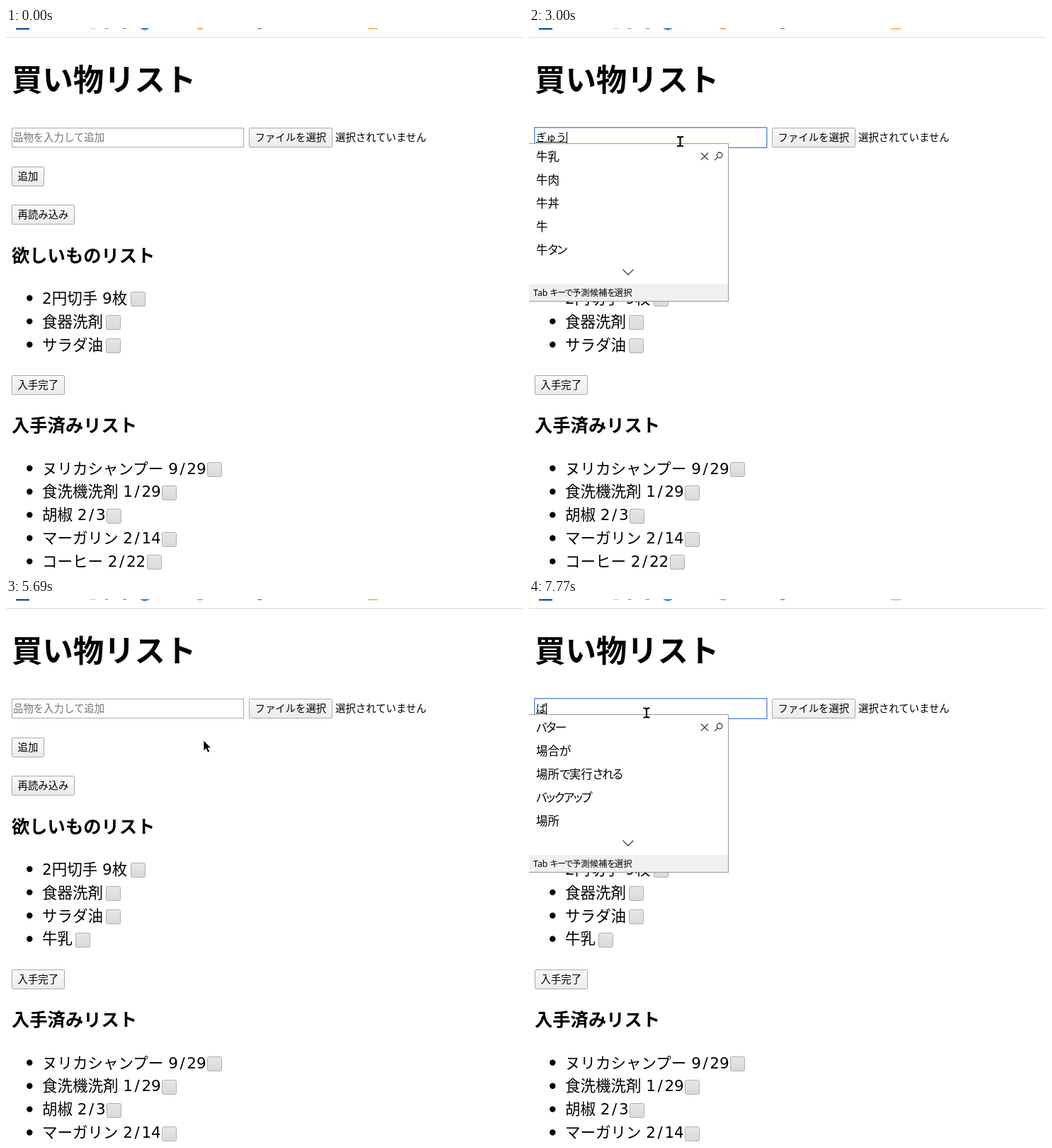
Write an HTML page that moves like this. It is 730 by 768 pixels and loops after 8000 ms.

```html
<!DOCTYPE html>
<html lang="ja">
<meta charset="utf-8">
<title>買い物リスト</title>
<style>
html, body { margin: 0; width: 100%; height: 100%; overflow: hidden; background: #fff }
svg { display: block; font-family: "DejaVu Sans", "Noto Sans CJK JP", "Noto Sans CJK", sans-serif }
.ime { font-family: "Noto Sans", "Noto Sans CJK JP", "Noto Sans CJK", sans-serif; font-feature-settings: "palt" }
.kana { letter-spacing: -.09em }
.slash { letter-spacing: .12em }
.drop { filter: drop-shadow(0 1px 2px #0006) }
</style>
<svg width="730" height="768" viewBox="0 0 730 768">
  <defs>
    <linearGradient id="face" x2="0" y2="1"><stop stop-color="#fafafa"/><stop offset="1" stop-color="#ebebeb"/></linearGradient>
    <linearGradient id="tick" x2="0" y2="1"><stop stop-color="#e6e6e6"/><stop offset="1" stop-color="#d9d9d9"/></linearGradient>
  </defs>
  <g id="scene"></g>
</svg>
<script>
const LOOP = 8000, SMALL = 14.4;
const scene = document.getElementById('scene');

const text = (x, y, size, str, attrs = '') =>
  `<text x="${x}" y="${y}" font-size="${size}" ${attrs}>${str}</text>`;
const span = (cls, pattern, str) => str.replace(pattern, `<tspan class="${cls}">$&</tspan>`);
const rect = (x, y, w, h, fill, attrs = '') =>
  `<rect x="${x}" y="${y}" width="${w}" height="${h}" fill="${fill}" ${attrs}/>`;
const line = (d, color, width = 1) =>
  `<path d="${d}" fill="none" stroke="${color}" stroke-width="${width}"/>`;
const button = (x, y, w, label) =>
  rect(x + .5, y + .5, w - 1, 27, 'url(#face)', 'stroke="#a9a9a9" rx="1"') + text(x + 8.5, y + 18.5, SMALL, label);
const heading = (y, size, str) => text(8, y, size, str, 'font-weight="700"');

// Items are [label, checkbox x]
const list = (items, top) => items.map(([label, x], i) => {
  const y = top + i * 32.9;
  return `<circle cx="33.3" cy="${y}" r="4.2"/>` + text(51, y + 7.7, 21.5, span('slash', /.\//, label)) +
    rect(x + .5, Math.round(y) - 8.5, 20, 20, 'url(#tick)', 'stroke="#b0b0b0" rx="2"');
}).join('');

const wanted = [['2円切手 9枚', 176], ['食器洗剤', 141], ['サラダ油', 141], ['牛乳', 98]];
const done = [['ヌリカシャンプー 9/29', 284], ['食洗機洗剤 1/29', 220], ['胡椒 2/3', 142],
  ['マーガリン 2/14', 220], ['コーヒー 2/22', 199]];

const toolbar = rect(14, 0, 19, 2.5, '#1d5fa5') +
  '<circle cx="196" cy="-5" r="8.3" fill="#4a90d0"/><circle cx="274" cy="-6" r="8" fill="#f2a04c"/>' +
  rect(511, 0, 14, 2, '#f5c27a') + rect(119, 0, 8, 1, '#c9c9c0') + rect(140, 0, 4, 1, '#777') +
  rect(165, 0, 5, 1, '#777') + rect(355, 0, 6, 1.5, '#8f9066') + rect(0, 13, 730, 1, '#dcdcdc');

// Contents of the field: [start, text, composing, candidates, selected]
const milk = ['牛乳', '牛肉', '牛丼', '牛', '牛タン'];
const butter = ['バター', '場合が', '場所で実行される', 'バックアップ', '場所'];
const typed = [
  [0, ''], [2500, 'ｇ', 1], [2590, 'ｇｙ', 1], [2680, 'ぎゅ', 1, milk], [2930, 'ぎゅう', 1, milk],
  [3490, '牛乳', 1, milk, 1], [4030, '牛乳'], [5320, ''], [7680, 'ｂ', 1], [7770, 'ば', 1, butter]
];
const focusSpans = [[1120, 5250], [6510, LOOP]];
const menuSpans = [[1120, 2500], [6510, 7680]];
const caretOff = [[1680, 2180], [4600, 5250], [7010, 7580]];
const within = (spans, t) => spans.find(([a, b]) => t >= a && t < b);

// Pointer path: [time, x, y]
const path = [[50, 640, 752], [570, 214, 159], [750, 214, 159], [800, 213.5, 160.5], [4720, 213.5, 160.5],
  [5190, 32, 209], [5440, 32, 209], [5690, 279, 200], [5800, 279, 200], [6060, 168.5, 143],
  [6240, 168.5, 143], [6310, 166, 161], [LOOP, 166, 161]];

function pointer(t) {
  if (t < 50) return '';
  const i = path.findIndex(p => p[0] > t), [t0, x0, y0] = path[i - 1], [t1, x1, y1] = path[i];
  const k = Math.min(1, Math.floor((t - t0) / 63) * 63 / (t1 - t0));
  const e = 1 - (1 - k) ** 2;
  const x = x0 + (x1 - x0) * e, y = y0 + (y1 - y0) * e;
  const beam = t >= 750 && x < 336 && y > 140 && y < 169;
  return `<g transform="translate(${x} ${y})">` + (beam
    ? line('M-4.5 -6.5H-1.5L0 -5.5L1.5 -6.5H4.5M0 -6V6M-4.5 6.5H-1.5L0 5.5L1.5 6.5H4.5', '#000', 2.2)
    : '<path d="M0 0V14.5L3.4 11.4L5.9 17L8.5 15.9L6.1 10.4H10.3Z" stroke="#fff" stroke-width=".6"/>') + '</g>';
}

function candidates(words, selected) {
  const imeText = (x, y, size, str) => text(x, y, size, span('kana', /[ぁ-ー]+/g, str));
  let out = rect(-1, 163.5, 282.5, 223, '#fff', 'stroke="#999"') + rect(0, 362, 281, 24, '#f0f0f0');
  if (selected) out += rect(0, 165, 281, 33, '#e3e3e3') + rect(0, 170, 4, 23, '#5c4a5c');
  words.forEach((w, i) => out += imeText(10, 188.3 + i * 32.8, 16.5, w));
  out += line('M243 176.5L253 186.5M253 176.5L243 186.5M262 187L266.5 182.5M132.5 341.5L140 349L147.5 341.5', '#4b3a4b', 1.3) +
    '<circle cx="269.2" cy="179.8" r="3.8" fill="none" stroke="#4b3a4b" stroke-width="1.3"/>' +
    imeText(6, 378.5, 12.4, 'Tab キーで予測候補を選択');
  return `<g class="ime">${out}</g>`;
}

function field(t) {
  const [, value, composing, words, selected] = typed.findLast(s => s[0] <= t);
  const focus = within(focusSpans, t), menu = within(menuSpans, t);
  const end = 10 + value.length * SMALL;
  let out = focus
    ? rect(7.75, 140.75, 328, 28.5, '#fff', 'stroke="#5f92da" stroke-width="1.5"')
    : rect(8.5, 141.5, 327, 27, '#fff', 'stroke="#a9a9a9"');
  out += value ? text(10, 159.5, SMALL, value) : text(10, 159.5, SMALL, '品物を入力して追加', 'fill="#757575"');
  if (composing) out += line(`M10 161.5H${end}`, '#000');
  if (focus && !within(caretOff, t)) out += rect(Math.round(end), 147, 1, 16, '#000');
  if (menu) out += `<g class="drop" opacity="${t < menu[0] + 60 ? .5 : 1}">` +
    '<path d="M7 170H336V223Q336 227 332 227H11Q7 227 7 223Z" fill="#fff"/>' +
    text(19.5, 202.5, 12.8, 'あｓｄ', 'font-weight="500"') + '</g>';
  if (words) out += candidates(words, selected);
  return out;
}

function draw(t) {
  const added = t >= 5320, shift = added ? 33 : 0;
  return toolbar + heading(89, 43.4, '買い物リスト') +
    button(343, 141, 118, 'ファイルを選択') + text(465, 159.5, SMALL, '選択されていません') +
    button(8, 196, 46, '追加') + button(8, 250, 89, '再読み込み') +
    heading(330.5, 25.3, '欲しいものリスト') + list(wanted.slice(0, added ? 4 : 3), 382) +
    button(8, 491 + shift, 75, '入手完了') + heading(571 + shift, 25.3, '入手済みリスト') +
    list(done, 622.8 + shift) + field(t) + pointer(t);
}

let last = '';
function frame() {
  const markup = draw(performance.now() % LOOP);
  if (markup !== last) scene.innerHTML = last = markup;
  requestAnimationFrame(frame);
}
frame();
</script>
</html>
```
